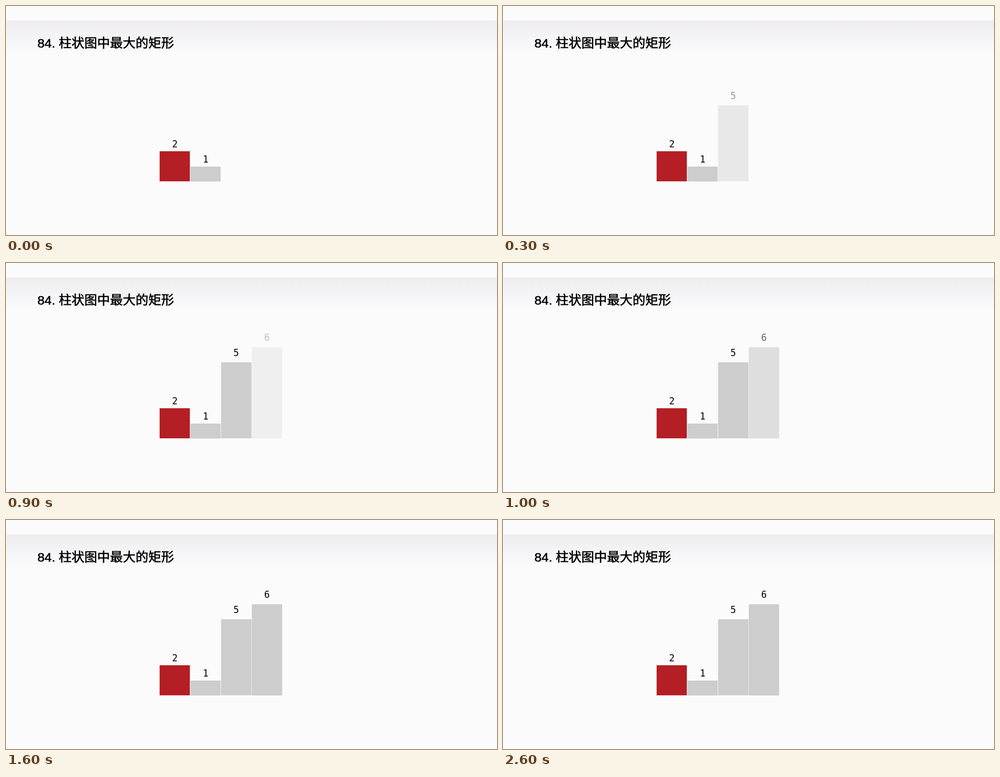
An HTML page that plays this animation: 1093 px wide and 512 px high, repeating every 2.7 s.

```html
<!DOCTYPE html>
<html lang="zh-CN">
<head>
<meta charset="utf-8">
<title>柱状图中最大的矩形</title>
<style>
  html, body { margin: 0; width: 100%; height: 100%; overflow: hidden; background: #fbfbfb; }
  svg { display: block; width: 100%; height: 100%; }
  .title {
    font: 400 28.5px "Liberation Sans", "Noto Sans CJK SC", "Noto Sans CJK", sans-serif;
    stroke: #000; stroke-width: .7px;
  }
  .bars text { font: 20.5px "DejaVu Sans Mono", monospace; text-anchor: middle; }
  .bars rect { fill: #cdcdcd; }
  .bars .current { fill: #b41e25; }
  .five { animation: five 2.7s step-end infinite; }
  .six { animation: six 2.7s step-end infinite; }
  /* Fades advance once every 100 ms */
  @keyframes five {
    0% { opacity: 0; }
    7.4% { opacity: .04; }
    11.1% { opacity: .4; }
    14.81% { opacity: .77; }
    18.51%, 100% { opacity: 1; }
  }
  @keyframes six {
    0% { opacity: 0; }
    33.32% { opacity: .24; }
    37.03% { opacity: .61; }
    40.74% { opacity: .96; }
    44.44%, 100% { opacity: 1; }
  }
</style>
</head>
<body>
<svg viewBox="0 0 1093 512">
  <defs>
    <linearGradient id="band" x1="0" y1="0" x2="0" y2="1">
      <stop offset="0" stop-color="#eeecef"/>
      <stop offset="1" stop-color="#fafafc"/>
    </linearGradient>
  </defs>
  <rect width="1093" height="512" fill="#fbfbfb"/>
  <rect x="1" y="32.5" width="1092" height="70" fill="url(#band)"/>
  <text class="title" x="70" y="93.3">84. 柱状图中最大的矩形</text>
  <g class="bars">
    <g>
      <rect class="current" x="342" y="324.7" width="67.3" height="67.3"/>
      <text x="376" y="316">2</text>
    </g>
    <g>
      <rect x="410.5" y="359" width="67.3" height="33.4"/>
      <text x="444.3" y="350">1</text>
    </g>
    <g class="five">
      <rect x="478.8" y="222" width="67.7" height="170"/>
      <text x="512.3" y="208">5</text>
    </g>
    <g class="six">
      <rect x="547.2" y="188.3" width="67.6" height="204"/>
      <text x="581" y="174">6</text>
    </g>
  </g>
</svg>
</body>
</html>
```
